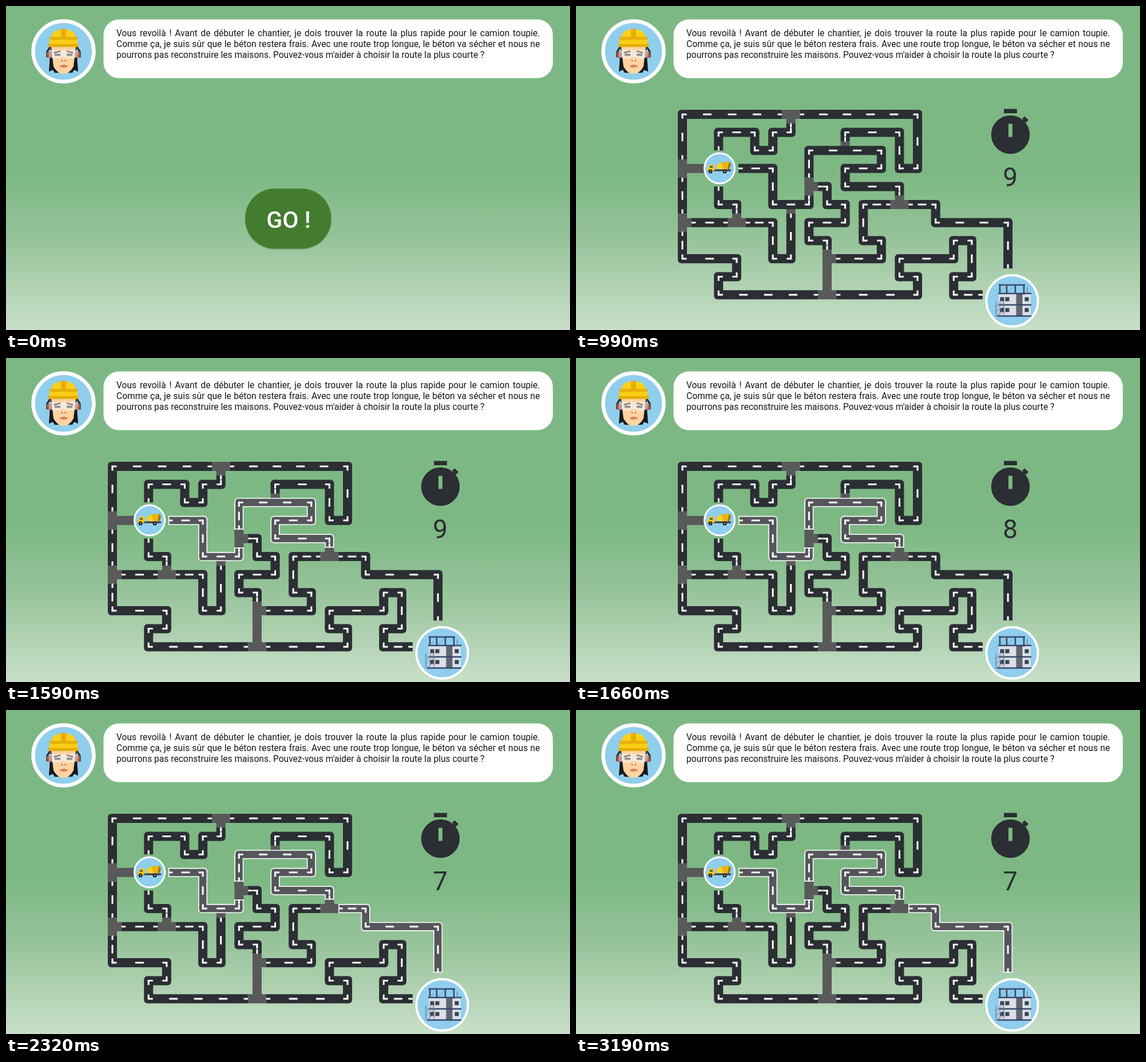
Animation, 986 px wide and 568 px high, one loop 3880 ms. Source, as an HTML page:

```html
<!DOCTYPE html>
<html lang="fr">
<head>
<meta charset="utf-8">
<title>La route la plus courte</title>
<style>
  html, body { margin: 0; width: 100%; height: 100%; overflow: hidden; }
  body { position: relative; background: linear-gradient(#7db884 292px, #83bb89 325px, #95c399 405px, #c9dfc8 568px); }
  svg { position: absolute; left: 0; top: 0; }
  #speech { position: absolute; left: 193px; top: 39.3px; width: 740.5px;
    font: 15.6px/18.72px Roboto, sans-serif; color: #161616; }
  #speech p { margin: 0; white-space: nowrap; text-align-last: justify; }
  #speech p:last-child { text-align-last: left; }
  text { font-family: Roboto, sans-serif; text-anchor: middle; }
</style>
</head>
<body>
<svg width="986" height="568" viewBox="0 0 986 568">
  <rect x="170.5" y="23.5" width="785.5" height="103" rx="27" fill="#fff"/>

  <g id="worker">
    <circle cx="100.5" cy="79.5" r="53" fill="#90ceed" stroke="#fff" stroke-width="6.500"/>
    <path d="M78 72H123L126 115 119 112 116 117H85L82 112 75 115Z" fill="#17181a"/>
    <path d="M79 72H122L118 106Q111 119 100.500 119T83 106Z" fill="#fdd3a1"/>
    <path d="M77 72 72 80V90M124 72 129 80V90" fill="none" stroke="#22242a" stroke-width="3"/>
    <path d="M74 80V91M127 80V91" stroke="#dc5c30" stroke-width="4"/>
    <path d="M77 77H124V90Q112 95 100.500 89 89 95 77 90Z" fill="#f4f5f2" fill-opacity=".65"/>
    <path d="M84 82 95 79M106 79 117 82" stroke="#6d6a66" stroke-width="2"/>
    <path d="M85 85.500H95M106 85.500H116" stroke="#8b9092" stroke-width="4"/>
    <path d="M97 96h1.500M103 96h1.500" stroke="#54372a" stroke-width="2"/>
    <path d="M93 106 98 103H103L109 105Q102 111 93 106Z" fill="#df8064"/>
    <path d="M79 56Q80 41 100.500 41T122 56Z" fill="#fdd018"/>
    <path d="M100.500 40V55" stroke="#e4ae0c" stroke-width="9"/>
    <path d="M76 57H125M74 69H127" stroke="#e6b00d" stroke-width="6"/>
    <path d="M76 63H125" stroke="#fdd018" stroke-width="7"/>
  </g>

  <g id="start">
    <rect x="418" y="321" width="151" height="106" rx="52" fill="#305a22" opacity=".25"/>
    <rect x="418" y="320" width="150.5" height="105.5" rx="52" fill="#437c2e"/>
    <text x="494" y="389" font-size="41" font-weight="500" fill="#fff">GO !</text>
  </g>

  <g id="game">
    <path id="junctions" fill="none" stroke="#595959"/>
    <g id="roads"></g>

    <g id="truck">
      <circle cx="251" cy="284.5" r="26.5" fill="#90ceed" stroke="#fff" stroke-width="3"/>
      <path d="M230 288H271" stroke="#3d3c35" stroke-width="3"/>
      <path d="M230 289V284L234 278H242V289Z" fill="#f7c614"/>
      <path d="M234 282H239" stroke="#3f5259" stroke-width="3"/>
      <path d="M245 280 254 274 268 273 271 278 268 286H248Z" fill="#e9b40f"/>
      <path d="M245 280 254 274 258 286H248Z" fill="#fbd128"/>
      <path d="M268 273 271 278 268 286H265Z" fill="#927718"/>
      <path d="M235 290h8m17 0h8" stroke="#24262a" stroke-width="7" stroke-linecap="round" stroke-dasharray="0 8"/>
      <path d="M235 290h8m17 0h8" stroke="#a5a7a8" stroke-width="2.500" stroke-linecap="round" stroke-dasharray="0 8"/>
    </g>

    <g id="site">
      <circle cx="762.5" cy="517" r="45" fill="#90ceed" stroke="#fff" stroke-width="4"/>
      <path d="M739 504H795V543H739Z" fill="#dcdfe7"/>
      <path d="M775 504V543" stroke="#606572" stroke-width="11"/>
      <g id="windows" fill="#394354"></g>
      <path d="M738 504H796M738 524H796M736 543.500H796M739 489H785M741 489V504M753 489V504M768 489V504M783 489V506" stroke="#34486d" stroke-width="2.6"/>
      <path d="M734 518V544M741 518V544M748 518V544M789 493V505" stroke="#697789" stroke-width="1.2"/>
      <path d="M734 527 748 519M734 535 748 527M734 544 748 535M741 503 753 490M755 503 767 490" stroke="#7d91ad"/>
    </g>

    <g id="stopwatch" fill="#2b2e33" stroke="#2b2e33" stroke-width="0">
      <circle cx="759.5" cy="225.5" r="33.700"/>
      <path d="M748 184.200H771" stroke-width="7.500"/>
      <path d="M778 208 786 200" stroke-width="5"/>
      <path d="M782 195.500 789 202" stroke-width="6" transform="rotate(0)"/>
      <path d="M759.500 206.500V229.500" stroke="#7db884" stroke-width="7"/>
      <text id="counter" x="759.3" y="316" font-size="46"></text>
    </g>
  </g>
</svg>
<div id="speech">
  <p>Vous revoilà ! Avant de débuter le chantier, je dois trouver la route la plus rapide pour le camion toupie.</p>
  <p>Comme ça, je suis sûr que le béton restera frais. Avec une route trop longue, le béton va sécher et nous ne</p>
  <p>pourrons pas reconstruire les maisons. Pouvez-vous m'aider à choisir la route la plus courte ?</p>
</div>
<script>
const LOOP = 3880, GAME_START = 660;
const CELL = 31.62, LEFT = 186, TOP = 190, ROAD_WIDTH = 16;
const $ = id => document.getElementById(id);

// Routes are paths on the maze grid, measured in cells.
const plainRoutes = [
  'M0 2.5 v-2.5 h5.5',
  'M6.5 0 h6.5 v3 h-1 v-2 h-3 v.5',
  'M6 .5 v.5 h-1 v1 h-1 v-1 h-2 v1',
  'M0 3.5 v2',
  'M0 6.5 v1.5 h3 v1 h-1 v1 h5.5',
  'M8.5 10 h4.5 v-1 h-1 v-1 h3 v-1 h1 v2 h-1 v1 h1.6',
  'M.5 6 h2',
  'M3.5 6 h1.5 v2 h1 v-2.5',
  'M2 4 v1 h1 v.5',
  'M7.5 4 h.5 v1 h1 v1 h-2 v1 h1 v.5',
  'M11.5 5 h-1.5 v2 h1 v1 h-2.5'
];
const junctions = `M5.5 0h1M6 0v.5 M0 2.5v1M0 3h1.2 M0 5.5v1M0 6h.5 M2.5 6h1M3 6v-.5
  M6 5v.5 M9 1.5v.5 M7 3.5v1M7 4h.5 M11.5 5h1M12 5v-.5 M8 7.5v2.5M8 8h.5M7.5 10h1`;

// Stretches the player picks, with the times at which each toggles.
const choices = [
  { route: 'M3.1 3 h1.9 v2 h2 v-.5', toggles: [1190] },
  { route: 'M7 3.5 v-1.5 h4 v1 h-2 v1 h3 v.5', toggles: [1590] },
  { route: 'M12.5 5 h1.5 v1 h4 v2.55', toggles: [1990, 2650, 3190] }
];

function trace(route) {
  const [start, ...moves] = route.split(' v').join('|v').split(' h').join('|h').split('|');
  let [x, y] = start.slice(1).split(' ').map(Number);
  const points = [[x, y]];
  for (const move of moves) {
    if (move[0] === 'h') x += +move.slice(1); else y += +move.slice(1);
    points.push([x, y]);
  }
  return points.map(([col, row]) => [LEFT + col * CELL, TOP + row * CELL]);
}

const line = ([x1, y1], [x2, y2], attrs) =>
  `<line x1="${x1}" y1="${y1}" x2="${x2}" y2="${y2}" ${attrs}/>`;
const square = ([x, y], size, r, fill) =>
  `<rect x="${x - size / 2}" y="${y - size / 2}" width="${size}" height="${size}" rx="${r}" fill="${fill}"/>`;
const legs = (points, draw) => points.slice(1).map((p, i) => draw(points[i], p)).join('');
const corners = (points, draw) => points.slice(1, -1).map(draw).join('');

// Straight legs plus rounded squares: only the outside of each bend is rounded.
const surface = (points, width, color, radius) =>
  legs(points, (a, b) => line(a, b, `stroke="${color}" stroke-width="${width}"`)) +
  corners(points, p => square(p, width, radius, color));

// Each leg starts and ends on half a dash, so bends get an L mark.
const markings = points => legs(points, (a, b) => {
  const length = Math.hypot(b[0] - a[0], b[1] - a[1]);
  const step = length / Math.round(0.6 + 0.62 * length / CELL);
  return line(a, b, `stroke="#fff" stroke-width="3" stroke-dasharray="15 ${step - 15}" stroke-dashoffset="7.5"`);
}) + corners(points, p => square(p, 3, 0, '#fff'));

function road(route) {
  const points = trace(route);
  return surface(points, ROAD_WIDTH, '#2b2e33', 6) + markings(points);
}

function pickedRoad(route) {
  const points = trace(route);
  const caps = [[points[0], points[1]], [points.at(-1), points.at(-2)]].map(([end, next]) => {
    const k = 1.6 / Math.hypot(next[0] - end[0], next[1] - end[1]);
    const inside = end.map((v, i) => v + (next[i] - v) * k);
    return line(end, inside, `stroke="#fff" stroke-width="${ROAD_WIDTH}"`);
  });
  return surface(points, ROAD_WIDTH, '#fff', 6) + surface(points, 12.8, '#55565b', 4.5) +
    markings(points) + caps.join('');
}

function addGroup(html) {
  const group = document.createElementNS('http://www.w3.org/2000/svg', 'g');
  group.innerHTML = html;
  return $('roads').appendChild(group);
}

$('junctions').setAttribute('d', junctions);
$('junctions').setAttribute('transform', `translate(${LEFT} ${TOP}) scale(${CELL})`);
$('junctions').setAttribute('stroke-width', ROAD_WIDTH / CELL);
plainRoutes.forEach(route => addGroup(road(route)));
for (const choice of choices) {
  choice.idle = addGroup(road(choice.route));
  choice.picked = addGroup(pickedRoad(choice.route));
}
for (const x of [745, 754, 788])
  for (const y of [514, 533]) $('windows').innerHTML += square([x, y], 7, 0, '#394354');

const show = (node, visible) => { node.style.display = visible ? '' : 'none'; };

function render(t) {
  show($('start'), t < GAME_START);
  show($('game'), t >= GAME_START);
  const ticks = Math.floor((t - 330) / 665);
  $('counter').textContent = ticks < 1 && t < 990 ? '' : 9 - Math.min(2, Math.floor((t - 990) / 665));
  for (const { idle, picked, toggles } of choices) {
    const isPicked = toggles.filter(at => t >= at).length % 2 === 1;
    show(idle, !isPicked);
    show(picked, isPicked);
  }
}

let origin;
function tick(now) {
  origin ??= now;
  render((now - origin) % LOOP);
  requestAnimationFrame(tick);
}
requestAnimationFrame(tick);
</script>
</body>
</html>
```
